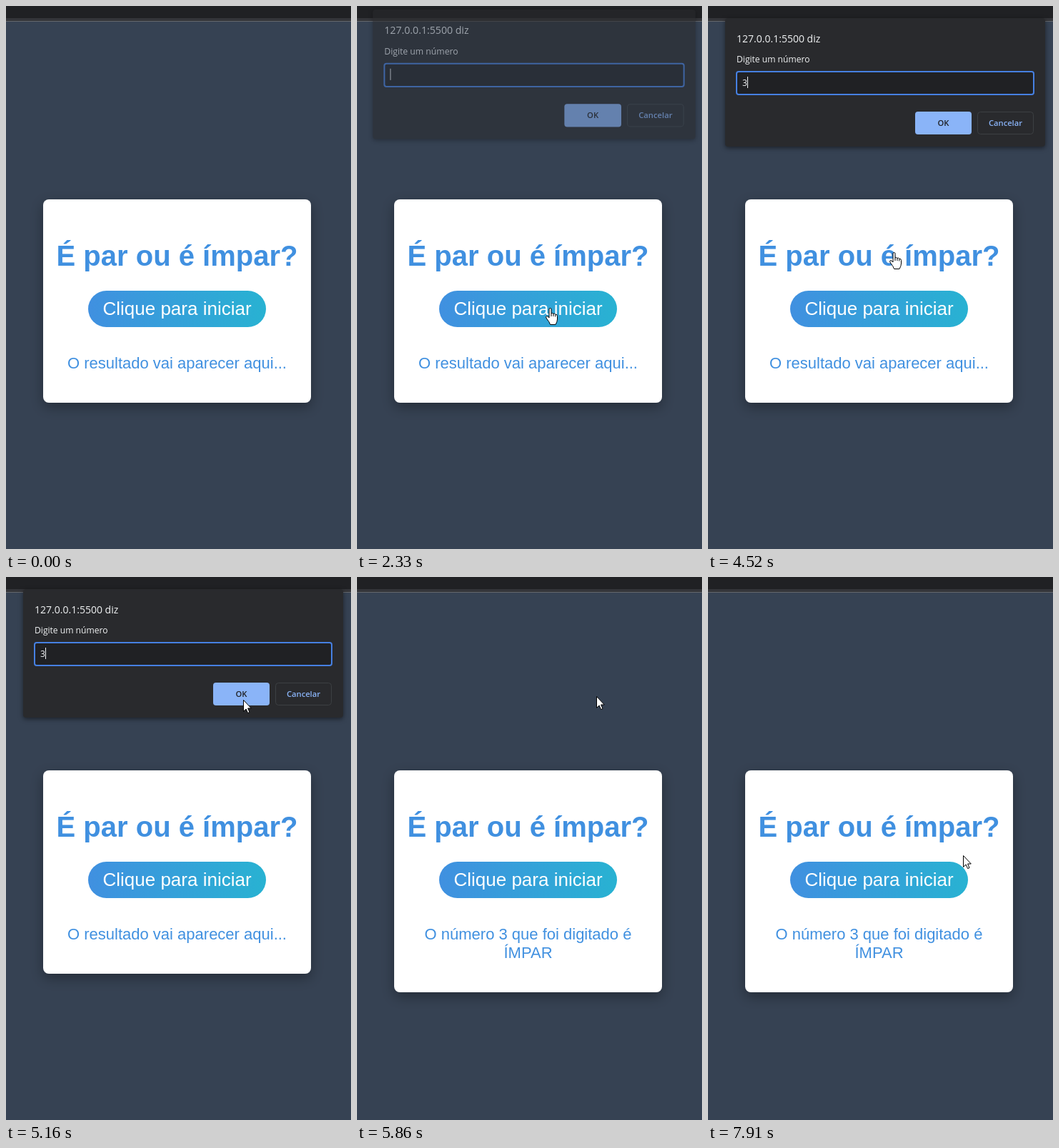
These frames come from a looping animation (483x761 px, 8 s). An HTML page with a canvas:

```html
<!DOCTYPE html>
<html lang="pt-BR">
<head>
<meta charset="utf-8">
<title>É par ou é ímpar?</title>
<style>
  html, body { margin: 0; width: 100%; height: 100%; overflow: hidden; background: #364253; }
  canvas { display: block; width: 483px; height: 761px; }
</style>
</head>
<body>
<canvas id="stage" width="483" height="761"></canvas>
<script>
const W = 483, H = 761, LOOP = 8000;
const stage = document.getElementById('stage').getContext('2d');
const layer = Object.assign(document.createElement('canvas'), { width: W, height: H }).getContext('2d');

const BLUE = '#4090e0';
const SANS = '"Liberation Sans", Arial, sans-serif';
const UI = '"Open Sans", "Noto Sans", sans-serif';

const ENTER = 430, OPEN = 2265, TYPED = 4050, PRESS = 5400, CLOSE = 5640, GONE = 5860;

const clamp = v => Math.max(0, Math.min(1, v));
const linear = p => p;
const easeOut = p => 1 - (1 - p) ** 2;

// Each move glides from the previous end point along a bent line
const home = { x: 447, y: 756 };
const moves = [
  { from: ENTER, to: 1220, x: 312, y: 494, bend: 0.06, ease: linear },
  { from: 1240, to: 1810, x: 270, y: 423, bend: 0, ease: easeOut },
  { from: 2070, to: 2100, x: 263, y: 410, bend: 0, ease: linear },
  { from: 2110, to: 2140, x: 270, y: 423, bend: 0, ease: linear },
  { from: 2560, to: 2880, x: 255, y: 367, bend: 0, ease: easeOut },
  { from: 4478, to: 5300, x: 335, y: 167, bend: -0.08, ease: easeOut },
  { from: 6250, to: 7040, x: 354, y: 301, bend: 0.11, ease: linear },
  { from: 7060, to: 7900, x: 357, y: 390, bend: -0.12, ease: linear }
];

function pointerAt(t) {
  let { x, y } = home;
  for (const m of moves) {
    if (t < m.from) break;
    const p = m.ease(clamp((t - m.from) / (m.to - m.from)));
    const dx = m.x - x, dy = m.y - y, bulge = 2 * p * (1 - p) * m.bend;
    x += dx * p - dy * bulge;
    y += dy * p + dx * bulge;
  }
  return { x: Math.round(x), y: Math.round(y) };
}

function box(c, x, y, w, h, r, fill, stroke, lineWidth = 1) {
  c.beginPath();
  c.roundRect(x, y, w, h, r);
  if (fill) { c.fillStyle = fill; c.fill(); }
  if (stroke) { c.strokeStyle = stroke; c.lineWidth = lineWidth; c.stroke(); }
}

function shadowBox(c, x, y, w, h, r, fill, blur, dy, alpha) {
  c.save();
  c.shadowColor = `rgba(0,0,0,${alpha})`;
  c.shadowBlur = blur;
  c.shadowOffsetY = dy;
  box(c, x, y, w, h, r, fill);
  c.restore();
}

function text(c, str, x, y, font, color, align = 'left') {
  c.font = font;
  c.fillStyle = color;
  c.textAlign = align;
  c.fillText(str, x, y);
}

function band(y, h, color) {
  stage.fillStyle = color;
  stage.fillRect(0, y, W, h);
}

function drawPage(answered) {
  band(0, H, '#364253');
  band(0, 17, '#202124');
  band(17, 4, '#35363a');
  band(21, 1, '#63676d');

  const mid = 239.5;
  shadowBox(stage, 52, 271, 375, answered ? 311 : 285, 8, '#fff', 18, 6, 0.32);
  text(stage, 'É par ou é ímpar?', mid, 364, `bold 40px ${SANS}`, BLUE, 'center');

  const grad = stage.createLinearGradient(115, 0, 364, 0);
  grad.addColorStop(0, BLUE);
  grad.addColorStop(1, '#28b2d2');
  box(stage, 115, 399, 249, 51, 25.5, grad);
  text(stage, 'Clique para iniciar', mid, 433, `26px ${SANS}`, '#fff', 'center');

  const lines = answered ? ['O número 3 que foi digitado é', 'ÍMPAR'] : ['O resultado vai aparecer aqui...'];
  lines.forEach((s, i) => text(stage, s, mid, 508 + i * 26, `22px ${SANS}`, BLUE, 'center'));
}

// The caret's 530 ms blink restarts when a key is typed
function caretOn(t) {
  const start = t < TYPED ? OPEN : TYPED;
  return t < PRESS && Math.floor((t - start) / 530) % 2 === 0;
}

function paintDialog(t) {
  const ink = '#f1f3f4', typed = t >= TYPED;
  shadowBox(layer, 24, 17, 448, 180, 4, '#292a2d', 6, 2, 0.5);
  text(layer, '127.0.0.1:5500 diz', 40, 51, `14px ${UI}`, ink);
  text(layer, 'Digite um número', 40, 79, `500 12.1px ${UI}`, ink);

  if (t < PRESS) box(layer, 40, 92, 416, 32, 3, '#202124', '#4680e2', 2);
  else box(layer, 40.5, 92.5, 415, 31, 3, '#202124', '#3c4043');
  if (typed) text(layer, '3', 48, 112, `12.1px ${UI}`, ink);
  if (caretOn(t)) {
    layer.fillStyle = ink;
    layer.fillRect(typed ? 55 : 48, 99, 1, 16);
  }

  box(layer, 290, 148, 79, 32, 4, t >= 5200 ? '#8db6ff' : '#8ab4f8');
  text(layer, 'OK', 329.5, 168, `600 11.2px ${UI}`, '#202124', 'center');
  box(layer, 377.5, 148.5, 78, 31, 4, null, '#3c4043');
  text(layer, 'Cancelar', 416.5, 168, `600 11.2px ${UI}`, '#8ab4f8', 'center');
}

// The whole dialog fades as one layer while it rises and grows slightly
function drawDialog(t) {
  if (t < OPEN || t >= GONE) return;
  const shown = easeOut(clamp((t - OPEN) / 200));
  const closed = clamp((t - CLOSE) / (GONE - CLOSE));
  const lift = 26 * (1 - shown) + 14 * closed;
  const scale = 1 + lift * 0.0007;

  layer.clearRect(0, 0, W, H);
  layer.save();
  layer.translate(248, 46 - lift);
  layer.scale(scale, scale);
  layer.translate(-248, -46);
  paintDialog(t);
  layer.restore();

  stage.globalAlpha = shown * (1 - closed ** 3);
  stage.drawImage(layer.canvas, 0, 0);
  stage.globalAlpha = 1;
}

const arrow = new Path2D('M.5 .5V16.4L4.1 13L6.6 18.6L9 17.6L6.6 12H11.3Z');
const beam = new Path2D('M-3.5 -7.5H-1L0 -6.5L1 -7.5H3.5M0 -7V7M-3.5 7.5H-1L0 6.5L1 7.5H3.5');
const hand = new Path2D('M-1 13V2Q-1 .5 .5 .5T2 2V8Q3.6 6.8 5 8.4Q6.6 7.4 7.8 9.2Q10.5 8.8 10.5 11.5V16Q10.5 19 8 23.5H.6Q-.4 20 -4.6 15Q-6.2 12.4 -4.7 11.6Q-3.2 11 -1 14Z');
const knuckles = new Path2D('M2 8V12M5 8.5V12M7.8 9.5V12.5');

// The page keeps its hand pointer while the dialog blocks it
function pointerKind(t, { y }) {
  const within = (top, bottom) => y >= top && y < bottom;
  if (t >= OPEN && t < GONE) return within(0, 197) ? 'arrow' : 'hand';
  if (within(399, 450) || within(410, 424)) return 'hand';
  return within(328, 374) || within(488, 514) ? 'beam' : 'arrow';
}

function drawPointer(t) {
  if (t < ENTER) return;
  const at = pointerAt(t), kind = pointerKind(t, at);
  stage.save();
  stage.translate(at.x, at.y);
  stage.strokeStyle = '#000';
  stage.fillStyle = '#fff';
  stage.lineWidth = 1;
  stage.lineJoin = 'round';
  if (kind === 'beam') {
    stage.lineWidth = 1.4;
    stage.stroke(beam);
  } else {
    const shape = kind === 'hand' ? hand : arrow;
    stage.fill(shape);
    stage.stroke(shape);
    if (kind === 'hand') stage.stroke(knuckles);
  }
  stage.restore();
}

const began = performance.now();
function frame() {
  const t = (performance.now() - began) % LOOP;
  drawPage(t >= CLOSE - 20);
  drawDialog(t);
  drawPointer(t);
  requestAnimationFrame(frame);
}
frame();
</script>
</body>
</html>
```
